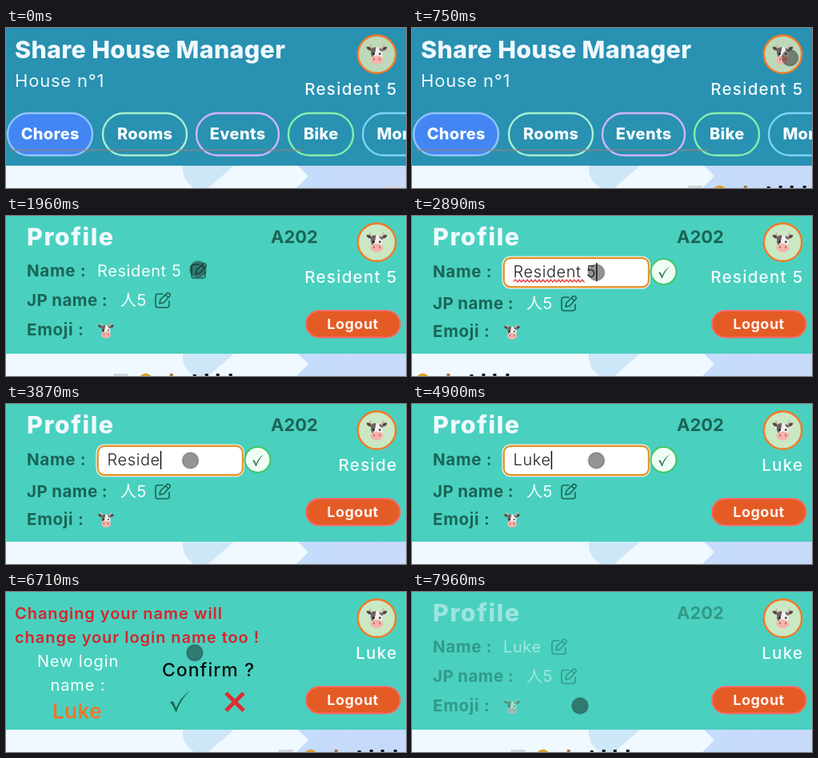
An HTML page that plays this animation: 500 by 201 pixels, repeating every 7.99 s.

```html
<!DOCTYPE html>
<html lang="en">
<head>
<meta charset="utf-8">
<title>Share House Manager</title>
<style>
  html, body { margin: 0; width: 100%; height: 100%; overflow: hidden; }
  svg { display: block; width: 100vw; height: 100vh; }
  text { font: 400 20px Inter, "Noto Sans CJK JP", "Noto Sans", sans-serif; letter-spacing: .6px; white-space: pre; }
  .mid { text-anchor: middle; }
  .title { font-weight: 800; font-size: 30.5px; letter-spacing: .3px; fill: #f0f9ff; }
  .tab text { font-weight: 800; letter-spacing: .3px; fill: #f8fdff; text-anchor: middle; }
  .tab rect { stroke-width: 2.4; }
  .label { font-weight: 700; font-size: 20.5px; letter-spacing: .7px; fill: #1a6555; }
  .value { fill: #f4fffd; }
  .warn { font-weight: 600; letter-spacing: .95px; fill: #d6252b; }
  .line { fill: none; stroke-linecap: round; stroke-linejoin: round; }
</style>
</head>
<body>
<svg viewBox="0 0 500 201" preserveAspectRatio="none">
  <defs>
    <clipPath id="reveal"><circle id="hole" cx="450" cy="35" r="0"/></clipPath>
    <linearGradient id="sky"><stop offset="0" stop-color="#c5dcfb"/><stop offset="1" stop-color="#c8d9fb"/></linearGradient>
    <g id="cow">
      <path d="M-6-8Q-9-9-8-12M6-8Q9-9 8-12" class="line" stroke="#cdb9a4" stroke-width="1.800"/>
      <path d="M-6-5Q-12-4-13-9Q-8-11-6-5ZM6-5Q12-4 13-9Q8-11 6-5Z" fill="#5c4440"/>
      <path d="M-7-7Q0-11 7-7Q8 0 6 8H-6Q-8 0-7-7Z" fill="#f1efec"/>
      <path d="M-1-9Q-6-9-7.500-6Q-8 0-6 4Q-2 1-1-9Z" fill="#6a6162"/>
      <path d="M7.200-6Q4-8 3-8.500Q3-4 7.500-3Z" fill="#6a6162"/>
      <circle cx="-3.800" cy="-.5" r="1.300" fill="#1d1818"/>
      <circle cx="3.800" cy="-.5" r="1.300" fill="#2b2423"/>
      <ellipse cy="7" rx="8" ry="5.500" fill="#f6b3ab"/>
      <path d="M-3.500 5.500v1.500M3.500 5.500v1.500" class="line" stroke="#a8605c" stroke-width="1.600"/>
    </g>
    <g id="pencil" class="line" stroke="#1a6555" stroke-width="1.600">
      <path d="M0-8H-6Q-9-8-9-5V6Q-9 9-6 9H5Q8 9 8 6V1"/>
      <path d="M-4 4L-3-1L5.500-9.200Q7-10 8.500-8.500Q10-7 9-5.800L1 3ZM3.500-7L7-3.500"/>
    </g>
    <path id="tick" d="M-12 1Q-9 2-4.500 14Q1-3 13-14Q1-6-4.500 8Q-7 0-9-1Z"/>
  </defs>

  <rect width="500" height="201" fill="#f0f9ff"/>
  <path d="M365 173L378 186L363 201H500V173Z" fill="url(#sky)"/>
  <path d="M221 173Q219 190 235 201H253L285 173Z" fill="#cde7f9"/>
  <g id="strip">
    <rect y="198" width="18" height="3" fill="#d3d7db"/>
    <path d="M33 201Q40 194 47 201Z" fill="#d9a32c"/>
    <rect x="70" y="198" width="4" height="3" fill="#a9763f"/>
    <path d="M99 199h4v2h-4zM114 198h4v3h-4zM128 198h4v3h-4zM144 198h4v3h-4z" fill="#16181c"/>
  </g>

  <rect width="500" height="173" fill="#2991b1"/>
  <text class="title" x="11" y="38">Share House Manager</text>
  <text x="11" y="73.500" fill="#eaf7fc" style="font-size:22px;letter-spacing:.8px">House n°1</text>
  <g id="tabs"></g>
  <rect x="5" y="152.500" width="366" height="2" fill="#8d8582" opacity=".7"/>

  <g clip-path="url(#reveal)">
    <rect width="500" height="173" fill="#4ad0bf"/>
    <rect x="375" y="119" width="117.500" height="33.500" rx="16.700" fill="#e55b26" stroke="#fb6a68" stroke-width="2"/>
    <text class="mid" x="433.500" y="142" fill="#fff5ef" style="font-weight:700;font-size:18px;letter-spacing:.5px">Logout</text>
  </g>

  <circle id="face" cx="463.500" cy="33" r="23.700" stroke="#f27a26" stroke-width="2.400"/>
  <use href="#cow" x="463.500" y="33"/>
  <text id="who" x="489.300" y="84" text-anchor="end" fill="#f4fdff" style="font-weight:500;font-size:20.5px;letter-spacing:1.3px"></text>

  <g id="profile">
    <text class="title" x="26" y="37" style="letter-spacing:1.5px">Profile</text>
    <text class="label" x="331" y="34" style="font-size:22px;letter-spacing:0">A202</text>
    <g id="nameRow">
      <text class="label" x="26" y="76">Name :</text>
      <g id="shown">
        <text id="name" class="value" x="114" y="76"></text>
        <g id="namePen"><use href="#pencil" y="69"/></g>
      </g>
    </g>
    <g id="jpRow">
      <text class="label" x="26" y="113" style="letter-spacing:.4px">JP name :</text>
      <text class="value" x="143" y="113">人5</text>
      <use href="#pencil" x="196" y="106"/>
    </g>
    <g id="emojiRow">
      <text class="label" x="26" y="150">Emoji :</text>
      <use href="#cow" transform="translate(125 144) scale(.76)"/>
    </g>
    <g id="editor">
      <rect x="112.500" y="50.500" width="185.500" height="41" rx="10.500" fill="#fff"/>
      <rect x="114.700" y="52.700" width="181.300" height="36.600" rx="8.500" fill="#fff" stroke="#e4962f" stroke-width="2.400"/>
      <text id="typed" x="126.500" y="77" fill="#222" style="font-weight:300"></text>
      <path id="squiggle" class="line" stroke="#e5383b" stroke-width="1.200"/>
      <rect id="caret" y="59" width="1.500" height="23" fill="#111"/>
      <circle cx="314.500" cy="70" r="16" fill="#f0fdf4" stroke="#43c76b" stroke-width="2.200"/>
      <use href="#tick" transform="translate(315 71) scale(.56)" fill="#175c45"/>
    </g>
  </g>

  <g id="confirm">
    <text class="warn" x="11" y="34">Changing your name will</text>
    <text class="warn" x="11" y="64">change your login name too !</text>
    <text class="value mid" x="90" y="94" style="letter-spacing:.9px">New login</text>
    <text class="value mid" x="90" y="124" style="letter-spacing:.9px">name :</text>
    <text class="mid" id="login" x="89" y="159" fill="#f0762b" style="font-weight:600;font-size:26px"></text>
    <text x="195" y="106" fill="#08110f" style="font-weight:500;font-size:23px;letter-spacing:1px">Confirm ?</text>
    <use href="#tick" x="217" y="138" fill="#17694f"/>
    <path d="M275 127L297 149M297 127L275 149" stroke="#db2f30" stroke-width="5"/>
  </g>

  <circle id="cursor" r="10" fill="#111" fill-opacity=".45" stroke="#222" stroke-opacity=".25" stroke-width="2"/>
</svg>
<script>
const LOOP = 7990, OLD = "Resident 5", NEW = "Luke";
const $ = id => document.getElementById(id);
const clamp = v => Math.min(1, Math.max(0, v));
const ramp = (t, a, b) => clamp((t - a) / (b - a));
const ease = p => p * p * (3 - 2 * p);
const show = (id, on) => $(id).setAttribute("visibility", on ? "inherit" : "hidden");
const move = (id, x, y) => $(id).setAttribute("transform", `translate(${x} ${y})`);

// label, left, width, border, fill
const tabs = [
  ["Chores", 2, 106, "#93c5fd", "#4386f3"],
  ["Rooms", 121, 105, "#a7f3d0", "none"],
  ["Events", 238, 103, "#d3b5fa", "none"],
  ["Bike", 353, 81, "#86efac", "none"],
  ["Money", 446, 104, "#7dd3fc", "none"]
];
$("tabs").innerHTML = tabs.map(([label, x, w, edge, fill]) =>
  `<g class="tab"><rect x="${x}" y="107" width="${w}" height="53" rx="26.5" fill="${fill}" stroke="${edge}"/>
   <text x="${x + w / 2 + .2}" y="140">${label}</text></g>`).join("");
$("login").textContent = NEW;

let wave = "M127 82";
for (let i = 1; i <= 36; i++) wave += `L${127 + i * 2.45} ${i % 2 ? 80 : 83}`;
$("squiggle").setAttribute("d", wave);

// time, x, y
const path = [
  [60, 297, 214], [790, 474, 36], [1620, 474, 36], [1910, 240, 67], [2440, 240, 67],
  [2700, 230.5, 71], [5480, 230.5, 71], [5740, 315, 70], [6280, 315, 70],
  [6700, 236, 76], [6760, 235, 80], [7060, 210, 143], [LOOP, 210, 143]
];
function cursorAt(t) {
  if (t <= path[0][0]) return path[0].slice(1);
  const i = path.findIndex(k => k[0] > t);
  const [a, x, y] = path[i - 1], [b, u, v] = path[i];
  const p = ease(ramp(t, a, b));
  return [x + (u - x) * p, y + (v - y) * p];
}

const strokes = [4520, 4670, 4820, 4900];
function nameAt(t) {
  if (t >= strokes[0]) return NEW.slice(0, strokes.filter(s => t >= s).length);
  if (t < 3280) return OLD;
  const held = t < 3810 ? 0 : 1 + Math.floor((t - 3810) / 28.5);
  return OLD.slice(0, Math.max(0, 9 - held));
}

function stripX(t) {
  const x = 475 - .1735 * t;
  return x < -160 ? x + 1030 : x;
}

function draw(t) {
  const name = nameAt(t), editing = t >= 2400 && t < 6000;
  move("strip", stripX(t), 0);
  $("hole").setAttribute("r", 480 * ease(ramp(t, 1045, 1640)));
  $("face").setAttribute("fill", t < 800 ? "#bdd9ba" : "#cae8c3");
  $("who").textContent = name;

  const opacity = t < 4000 ? ramp(t, 1450, 1930)
    : t < 7000 ? 1 - ramp(t, 5740, 6000) : ramp(t, 7710, 8210);
  $("profile").setAttribute("opacity", opacity);
  $("confirm").setAttribute("opacity", ramp(t, 6000, 6280) - ramp(t, 7150, 7600));

  move("nameRow", 0, editing ? 1 : 0);
  move("jpRow", 0, editing ? 4 : 0);
  move("emojiRow", 0, editing ? 1.5 : 0);
  show("shown", !editing);
  show("editor", editing);
  $("name").textContent = name;
  move("namePen", t < 4000 ? 241 : 184, 0);

  $("typed").textContent = name;
  const end = name ? $("typed").getComputedTextLength() : 0;
  $("caret").setAttribute("x", 126.5 + end);
  show("caret", editing && !(t >= 4240 && t < 4520) && t < 5360);
  show("squiggle", editing && name.startsWith("Resident"));
  move("cursor", ...cursorAt(t));
}

const start = performance.now();
function tick(now) {
  draw(Math.max(0, now - start) % LOOP);
  requestAnimationFrame(tick);
}
draw(0);
requestAnimationFrame(tick);
</script>
</body>
</html>
```
